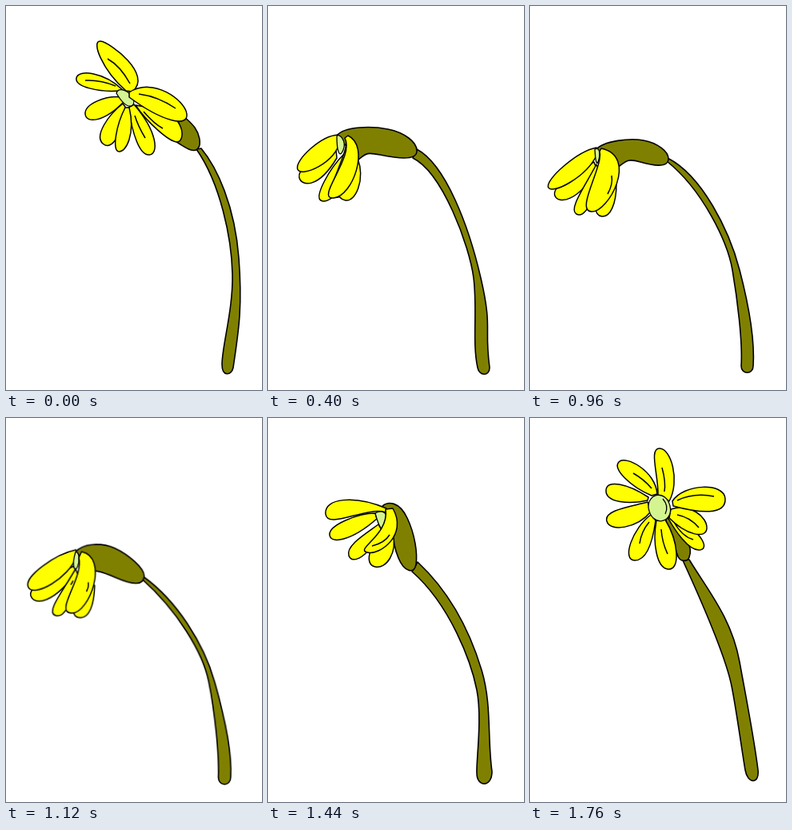
An HTML page without scripts that plays this animation: 320 by 480 pixels, repeating every 1840 ms.

```html
<!DOCTYPE html>
<html lang="en">
<head>
<meta charset="utf-8">
<title>Nodding flower</title>
<style>
html, body { margin: 0; width: 100%; height: 100%; overflow: hidden; background: #fff; }
svg { display: block; width: 100%; height: 100%; }

/* Every pose change lands on an 80 ms beat, so each span is cut into whole steps. */
path { animation: 1.84s steps(4) infinite; stroke: #000; stroke-width: 1.6; stroke-linejoin: round; }
.green { fill: #808000; }
.petal { fill: #ff0; stroke-width: 1.5; }
.heart { fill: #d4f490; stroke-width: 1.3; }
#flower { transform-origin: 268px 455px; animation: sway 1.84s steps(1) infinite; }

@keyframes sway {
  0%, 21.73%, 39.13%, 52.17%, 69.56%, 95.65%, 100% { transform: rotate(0deg); }
  26.08%, 56.52%, 65.21% { transform: rotate(-.7deg); }
  34.78% { transform: rotate(-.8deg); }
  30.43%, 43.47%, 47.82%, 60.86% { transform: rotate(-1.2deg); }
  91.3% { transform: rotate(.3deg); }
}
@keyframes stem {
  0%, 100% { d: path("M244 178C264 202 286 250 291 315S290 410 284 452C282 462 270 464 270 448C270 425 284 380 283 335S268 222 238 179Z"); animation-timing-function: steps(5); }
  21.73% { d: path("M186 179C222 198 251 275 266 340S270 400 277 452C277 463 264 463 262 452C255 420 262 380 257 340S218 208 181 190Z"); }
  39.13% { d: path("M176 185C215 215 248 280 262 335S262 410 269 448C269 460 261 460 259 446C256 420 256 380 249 340S208 228 174 191Z"); animation-timing-function: steps(3); }
  52.17% { d: path("M172 190C215 212 249 280 262 330S281 420 279 450C279 461 264 461 264 450C266 420 259 365 253 330S216 230 171 194Z"); }
  69.56% { d: path("M184 204C220 242 252 280 265 330S286 420 283 448C283 461 267 461 267 448C269 420 266 365 259 328S222 250 181 206Z"); animation-timing-function: steps(2); }
  78.26% { d: path("M187 180C232 222 254 272 267 315S274 400 280 442C280 462 261 462 261 444C260 430 268 375 261 340S228 234 180 192Z"); animation-timing-function: steps(3); }
  91.3%, 95.65% { d: path("M199 177C222 215 252 250 262 305S280 400 285 440C287 458 272 458 269 440C264 410 258 365 252 335S224 250 191 178Z"); animation-timing-function: steps(1); }
}
@keyframes cup {
  0%, 100% { d: path("M218 134C224 140 231 145 236 152S245 172 240 178S226 178 218 173S214 170 212 166Z"); animation-timing-function: steps(5); }
  21.73% { d: path("M86 162C96 150 130 150 150 154S187 170 186 182S160 190 140 186S122 186 113 192Z"); }
  39.13% { d: path("M82 180C92 165 125 160 145 162S180 178 176 188S160 193 140 191S118 193 108 203Z"); animation-timing-function: steps(3); }
  52.17% { d: path("M82 180C92 168 125 165 142 168S174 182 173 192S155 200 138 195S120 194 108 203Z"); }
  69.56% { d: path("M105 147C112 138 128 140 142 152S186 190 183 202S170 212 148 199S128 185 122 172Z"); animation-timing-function: steps(2); }
  78.26% { d: path("M143 110C150 104 164 104 174 125S187 170 185 183S170 192 163 175S157 148 155 130Z"); animation-timing-function: steps(3); }
  91.3%, 95.65% { d: path("M170 125C176 125 186 138 194 150S201 168 199 174S188 180 185 173S178 150 170 130Z"); animation-timing-function: steps(1); }
}
/* Petals: outline from base round the tip, then a vein that shrinks away when closed. */
@keyframes top {
  0%, 100% { d: path("M150 106C120 80 106 43 118 44S184 86 158 107ZM127 66Q143 75 155 97"); animation-timing-function: steps(5); }
  21.73% { d: path("M89 168C83 190 46 208 42 202S68 168 88 164ZM80 170Q80 170 80 170"); }
  39.13% { d: path("M82 183C68 208 32 230 28 223S56 184 81 178ZM74 184Q74 184 74 184"); animation-timing-function: steps(3); }
  52.17% { d: path("M82 185C68 210 32 231 28 224S58 187 82 180ZM74 186Q74 186 74 186"); }
  69.56% { d: path("M105 152C95 174 54 194 48 186S80 154 103 148ZM95 154Q95 154 95 154"); animation-timing-function: steps(2); }
  78.26% { d: path("M145 117C122 111 80 132 76 120S108 100 146 114ZM135 111Q135 111 135 111"); animation-timing-function: steps(3); }
  91.3%, 95.65% { d: path("M160 97C161 72 148 38 162 38S188 78 174 104ZM165 62Q170 80 168 92"); animation-timing-function: steps(1); }
}
@keyframes farUpper {
  0%, 100% { d: path("M142 106C116 108 86 101 88 90S122 82 146 105ZM99 93Q118 92 137 100"); animation-timing-function: steps(5); }
  21.73% { d: path("M90 168C86 196 41 215 37 204S66 162 88 161ZM82 170Q82 170 82 170"); }
  39.13% { d: path("M82 184C70 212 28 234 23 226S55 180 81 176ZM74 186Q74 186 74 186"); animation-timing-function: steps(3); }
  52.17% { d: path("M83 187C70 214 28 236 23 227S58 182 83 177ZM74 187Q74 187 74 187"); }
  69.56% { d: path("M106 150C98 180 50 204 43 186S78 150 104 145ZM96 154Q96 154 96 154"); animation-timing-function: steps(2); }
  78.26% { d: path("M147 118C124 110 74 140 72 120S108 96 148 113ZM138 112Q138 112 138 112"); animation-timing-function: steps(3); }
  91.3%, 95.65% { d: path("M152 97C126 86 103 64 111 55S157 66 159 95ZM129 69Q143 77 152 88"); animation-timing-function: steps(1); }
}
@keyframes farLower {
  0%, 100% { d: path("M146 114C124 111 98 123 99 135S122 146 148 119Z"); animation-timing-function: steps(5); }
  21.73% { d: path("M85 180C60 190 37 203 39 214S62 230 86 190Z"); }
  39.13% { d: path("M80 192C55 205 27 226 31 237S62 246 82 200Z"); animation-timing-function: steps(3); }
  52.17% { d: path("M80 195C55 208 27 226 31 237S62 245 83 203Z"); }
  69.56% { d: path("M100 168C75 178 37 184 41 198S70 210 104 172Z"); animation-timing-function: steps(2); }
  78.26% { d: path("M134 119C112 119 76 134 77 146S104 154 136 126Z"); animation-timing-function: steps(3); }
  91.3%, 95.65% { d: path("M148 99C122 82 95 76 95 91S124 108 147 103Z"); animation-timing-function: steps(1); }
}
@keyframes midLeft {
  0%, 100% { d: path("M146 122C128 136 110 162 121 172S146 160 149 126Z"); animation-timing-function: steps(5); }
  21.73% { d: path("M95 190C79 208 64 232 70 239S92 230 98 193Z"); }
  39.13% { d: path("M83 200C68 225 53 248 59 256S78 242 87 208Z"); animation-timing-function: steps(3); }
  52.17% { d: path("M83 202C70 226 54 248 60 256S78 242 86 210Z"); }
  69.56% { d: path("M102 175C88 198 68 217 76 221S86 208 105 185Z"); animation-timing-function: steps(2); }
  78.26% { d: path("M138 133C120 146 97 160 101 172S126 174 142 140Z"); animation-timing-function: steps(3); }
  91.3%, 95.65% { d: path("M147 105C125 111 92 115 96 129S134 138 151 117Z"); animation-timing-function: steps(1); }
}
@keyframes midLow {
  0%, 100% { d: path("M149 127C138 148 132 181 141 182S162 160 154 127ZM149 140Q149 140 149 140"); animation-timing-function: steps(5); }
  21.73% { d: path("M95 185C76 204 58 238 66 243S95 235 100 190ZM90 210Q90 210 90 210"); }
  39.13% { d: path("M83 195C66 225 46 254 57 260S82 245 88 205ZM80 215Q80 215 80 215"); animation-timing-function: steps(3); }
  52.17% { d: path("M83 198C67 228 48 254 58 260S80 245 87 208ZM80 215Q80 215 80 215"); }
  69.56% { d: path("M102 172C86 196 60 222 74 225S88 212 107 185ZM98 184Q96 190 92 194"); animation-timing-function: steps(2); }
  78.26% { d: path("M147 142C132 160 124 178 134 181S153 165 154 145ZM145 155Q145 155 145 155"); animation-timing-function: steps(3); }
  91.3%, 95.65% { d: path("M151 121C128 138 114 178 131 178S154 150 157 128ZM149 130Q139 142 137 157"); animation-timing-function: steps(1); }
}
@keyframes bottom {
  0%, 100% { d: path("M153 127C158 160 167 187 179 186S190 158 160 123ZM161 137Q165 150 174 165"); animation-timing-function: steps(5); }
  21.73% { d: path("M95 190C84 215 72 236 84 239S105 225 104 190ZM98 205Q98 205 98 205"); }
  39.13% { d: path("M88 205C78 235 76 250 86 253S104 235 104 205ZM92 220Q92 220 92 220"); animation-timing-function: steps(3); }
  52.17% { d: path("M88 205C76 232 74 248 84 252S102 235 103 205ZM92 220Q92 220 92 220"); }
  69.56% { d: path("M106 185C96 208 92 218 98 219S116 205 118 180ZM108 195Q108 195 108 195"); animation-timing-function: steps(2); }
  78.26% { d: path("M149 143C136 160 128 176 136 179S152 165 154 146ZM146 155Q146 155 146 155"); animation-timing-function: steps(3); }
  91.3%, 95.65% { d: path("M158 128C153 155 158 188 173 189S186 155 169 127ZM164 139Q165 155 172 170"); animation-timing-function: steps(1); }
}
@keyframes nearLow {
  0%, 100% { d: path("M162 124C176 145 204 170 214 170S226 136 185 128ZM172 132Q186 148 196 153"); animation-timing-function: steps(5); }
  21.73% { d: path("M95 200C85 230 85 241 97 243S122 218 112 190ZM102 215Q102 215 102 215"); }
  39.13% { d: path("M90 215C82 248 80 260 92 261S108 245 110 220ZM96 230Q96 230 96 230"); animation-timing-function: steps(3); }
  52.17% { d: path("M90 215C78 248 80 262 90 263S108 248 108 222ZM94 230Q94 230 94 230"); }
  69.56% { d: path("M105 195C94 220 92 229 104 229S122 215 124 190ZM110 205Q110 205 110 205"); animation-timing-function: steps(2); }
  78.26% { d: path("M145 140C126 160 120 183 134 186S162 168 156 145ZM146 155Q146 155 146 155"); animation-timing-function: steps(3); }
  91.3%, 95.65% { d: path("M172 124C182 142 198 165 211 165S219 146 182 124ZM180 130Q190 148 204 152"); animation-timing-function: steps(1); }
}
@keyframes nearMid {
  0%, 100% { d: path("M160 112C180 105 215 118 215 130S195 135 160 115ZM180 118Q180 118 180 118"); animation-timing-function: steps(5); }
  21.73% { d: path("M100 170C110 180 108 225 88 230S98 190 98 170ZM102 190Q102 190 102 190"); }
  39.13% { d: path("M91 190C104 195 104 235 84 245S92 205 90 190ZM95 210Q95 210 95 210"); animation-timing-function: steps(3); }
  52.17% { d: path("M91 190C102 195 102 235 82 245S90 205 90 190ZM94 210Q94 210 94 210"); }
  69.56% { d: path("M113 160C122 170 118 205 104 212S112 185 110 165ZM114 180Q114 180 114 180"); animation-timing-function: steps(2); }
  78.26% { d: path("M156 130C164 148 144 164 130 162S150 150 154 130ZM152 148Q152 148 152 148"); animation-timing-function: steps(3); }
  91.3%, 95.65% { d: path("M176 114C200 106 222 124 221 138S195 146 174 125ZM184 121Q200 124 211 137"); animation-timing-function: steps(1); }
}
@keyframes nearTop {
  0%, 100% { d: path("M154 108C184 88 224 118 226 135S196 145 154 114ZM166 110Q190 113 212 128"); animation-timing-function: steps(5); }
  21.73% { d: path("M100 162C128 175 106 238 82 240S109 188 96 165ZM105 222Q105 222 105 222"); }
  39.13% { d: path("M90 177C134 190 98 259 79 257S95 200 87 182ZM103 213Q105 226 99 237"); animation-timing-function: steps(3); }
  52.17% { d: path("M89 178C136 188 98 258 77 257S92 200 87 182ZM102 212Q104 223 97 235"); }
  69.56% { d: path("M112 149C134 155 120 224 96 223S114 192 107 160ZM114 192Q114 192 114 192"); animation-timing-function: steps(2); }
  78.26% { d: path("M156 113C175 146 140 172 124 168S152 146 147 114ZM130 160Q146 156 152 146"); animation-timing-function: steps(3); }
  91.3%, 95.65% { d: path("M178 104C192 82 243 80 244 101S212 119 179 110ZM184 103Q205 93 230 98"); animation-timing-function: steps(1); }
}
@keyframes heart {
  0%, 100% { d: path("M138 109C140 100 155 106 159 116S152 133 138 109ZM149 115Q149 115 149 115"); animation-timing-function: steps(5); }
  21.73% { d: path("M86 163C88 158 99 168 94 180S86 180 86 163ZM91 175Q91 175 91 175"); }
  39.13% { d: path("M80 178C86 176 89 188 86 196S81 200 80 178ZM84 188Q84 188 84 188"); animation-timing-function: steps(3); }
  52.17% { d: path("M81 179C87 176 88 184 86 192S82 198 81 179ZM84 186Q84 186 84 186"); }
  69.56% { d: path("M105 148C110 152 108 168 104 173S92 168 105 148ZM102 163Q102 163 102 163"); animation-timing-function: steps(2); }
  78.26% { d: path("M134 119C142 114 152 118 148 132S139 138 134 119ZM141 123Q141 123 141 123"); animation-timing-function: steps(3); }
  91.3%, 95.65% { d: path("M148 112C147 94 170 89 175 110S152 138 148 112ZM166 101Q174 110 169 120"); animation-timing-function: steps(1); }
}
</style>
</head>
<body>
<svg viewBox="0 0 320 480">
  <g id="flower">
    <path class="green" style="animation-name:stem"/>
    <path class="green" style="animation-name:cup"/>
    <path class="petal" style="animation-name:top"/>
    <path class="petal" style="animation-name:farLower"/>
    <path class="petal" style="animation-name:farUpper"/>
    <path class="petal" style="animation-name:bottom"/>
    <path class="petal" style="animation-name:midLeft"/>
    <path class="petal" style="animation-name:midLow"/>
    <path class="petal" style="animation-name:nearLow"/>
    <path class="petal" style="animation-name:nearMid"/>
    <path class="heart" style="animation-name:heart"/>
    <path class="petal" style="animation-name:nearTop"/>
  </g>
</svg>
</body>
</html>
```
